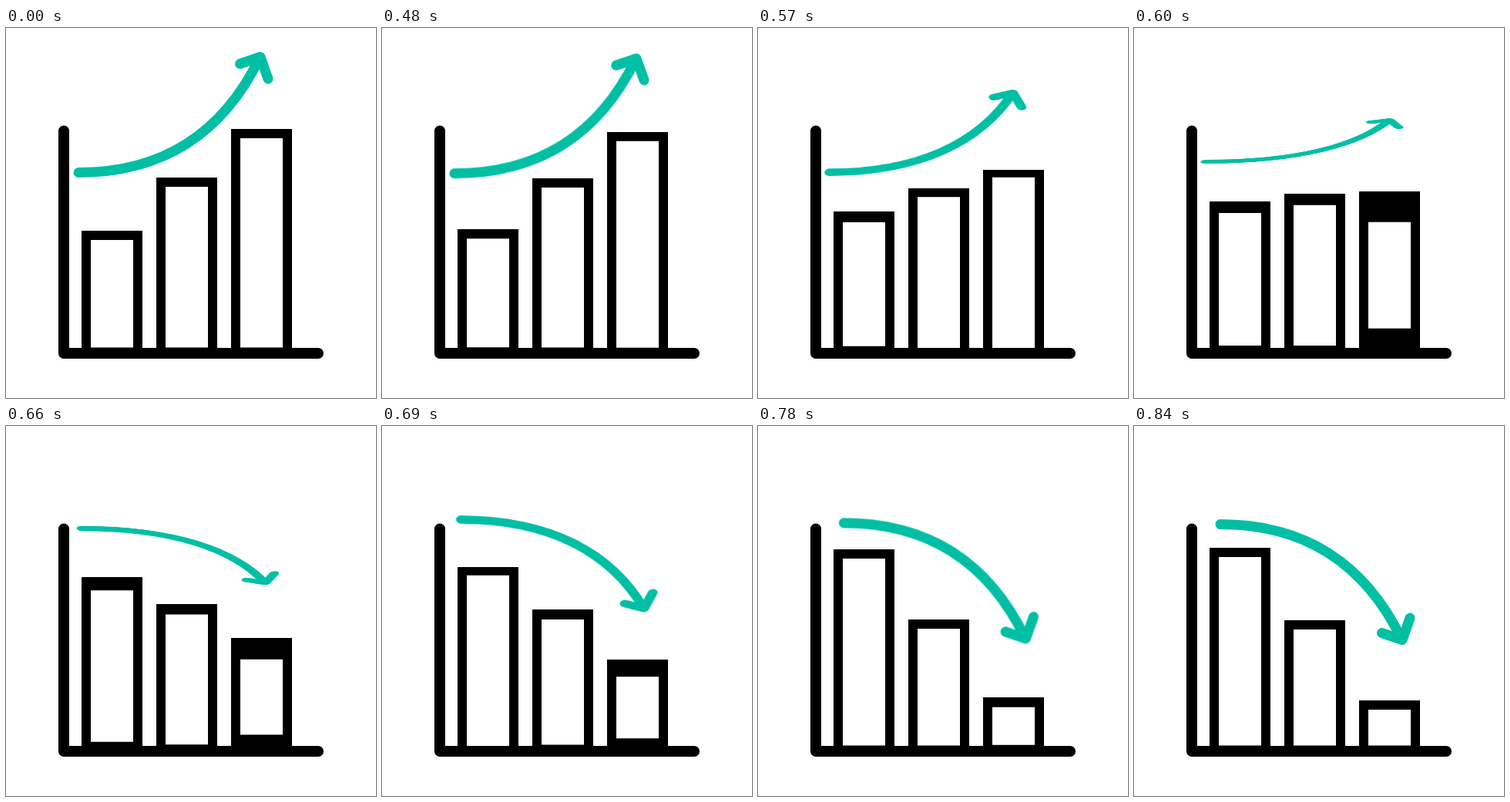
An HTML page with a canvas for the animation above (1290 ms loop, 480 px wide and 480 px high).

```html
<!DOCTYPE html>
<html lang="en">
<head>
<meta charset="utf-8">
<title>Bar chart trend</title>
<style>
  html, body { margin: 0; width: 100%; height: 100%; overflow: hidden; background: #fff; }
  .stage { position: relative; width: 480px; height: 480px; overflow: hidden; perspective: 1370px; perspective-origin: 240px 240px; }
  canvas, svg { position: absolute; left: 0; top: 0; display: block; }
  svg { overflow: visible; transform-origin: 240px 112.5px; }
  path { fill: none; stroke: #00bfa5; stroke-width: 13; stroke-linecap: round; stroke-linejoin: round; }
</style>
</head>
<body>
<div class="stage">
  <canvas id="chart" width="480" height="480"></canvas>
  <svg id="arrow" width="480" height="480" viewBox="0 0 480 480">
    <path d="M94 187.5C200 187.5 280 140 329.5 38"/>
    <path d="M303.5 46.5L330 37.5L340 66"/>
  </svg>
</div>
<script>
const LOOP = 1290, STEP = 30, START = 447, SPAN = 366;
const FLOOR = 418, LINE = 12, WIDTH = 79;
const BARS = [
  { x: 98, from: 263, to: 158 },
  { x: 195, from: 194, to: 252 },
  { x: 292, from: 131, to: 356 }
];
const ctx = document.getElementById('chart').getContext('2d');
const arrow = document.getElementById('arrow');

const lerp = (a, b, p) => a + (b - a) * p;

// cubic-bezier(.42, 0, .58, 1)
function easeInOut(u) {
  if (u <= 0) return 0;
  if (u >= 1) return 1;
  let lo = 0, hi = 1, s;
  for (let i = 0; i < 24; i++) {
    s = (lo + hi) / 2;
    const r = 1 - s;
    if (1.26 * s * r * r + 1.74 * s * s * r + s * s * s < u) lo = s;
    else hi = s;
  }
  return s * s * (3 - 2 * s);
}

// Outline of a bar drawn with height "rest", stretched up to "top"
function drawBar(x, top, rest) {
  const k = (FLOOR - top) / (FLOOR - rest);
  const innerTop = top + LINE * k;
  const innerBottom = 414.5 - 10.7 * (k - 1);
  ctx.beginPath();
  ctx.rect(x, top, WIDTH, 424 - top);
  ctx.rect(x + LINE, innerTop, WIDTH - 2 * LINE, Math.min(424, innerBottom) - innerTop);
  ctx.fill('evenodd');
}

function drawAxes() {
  ctx.lineWidth = 14;
  ctx.lineCap = ctx.lineJoin = 'round';
  ctx.beginPath();
  ctx.moveTo(75, 133.5);
  ctx.lineTo(75, 422);
  ctx.lineTo(405, 422);
  ctx.stroke();
}

function render(ms) {
  const t = Math.floor((ms % LOOP) / STEP) * STEP;
  const p = t < 480 ? 0 : easeInOut((t - START) / SPAN);

  ctx.clearRect(0, 0, 480, 480);
  for (const { x, from, to } of BARS) {
    const top = Math.round(lerp(from, to, p));
    if (t < 690) drawBar(x, top, from);
    if (t >= 600) drawBar(x, top, to);
  }
  drawAxes();

  arrow.style.transform = `translate(${18 * p}px, ${90 * p}px) rotateX(${180 * p}deg)`;
}

let begin;
function tick(now) {
  if (begin === undefined) begin = now;
  render(now - begin);
  requestAnimationFrame(tick);
}
render(0);
requestAnimationFrame(tick);
</script>
</body>
</html>
```
